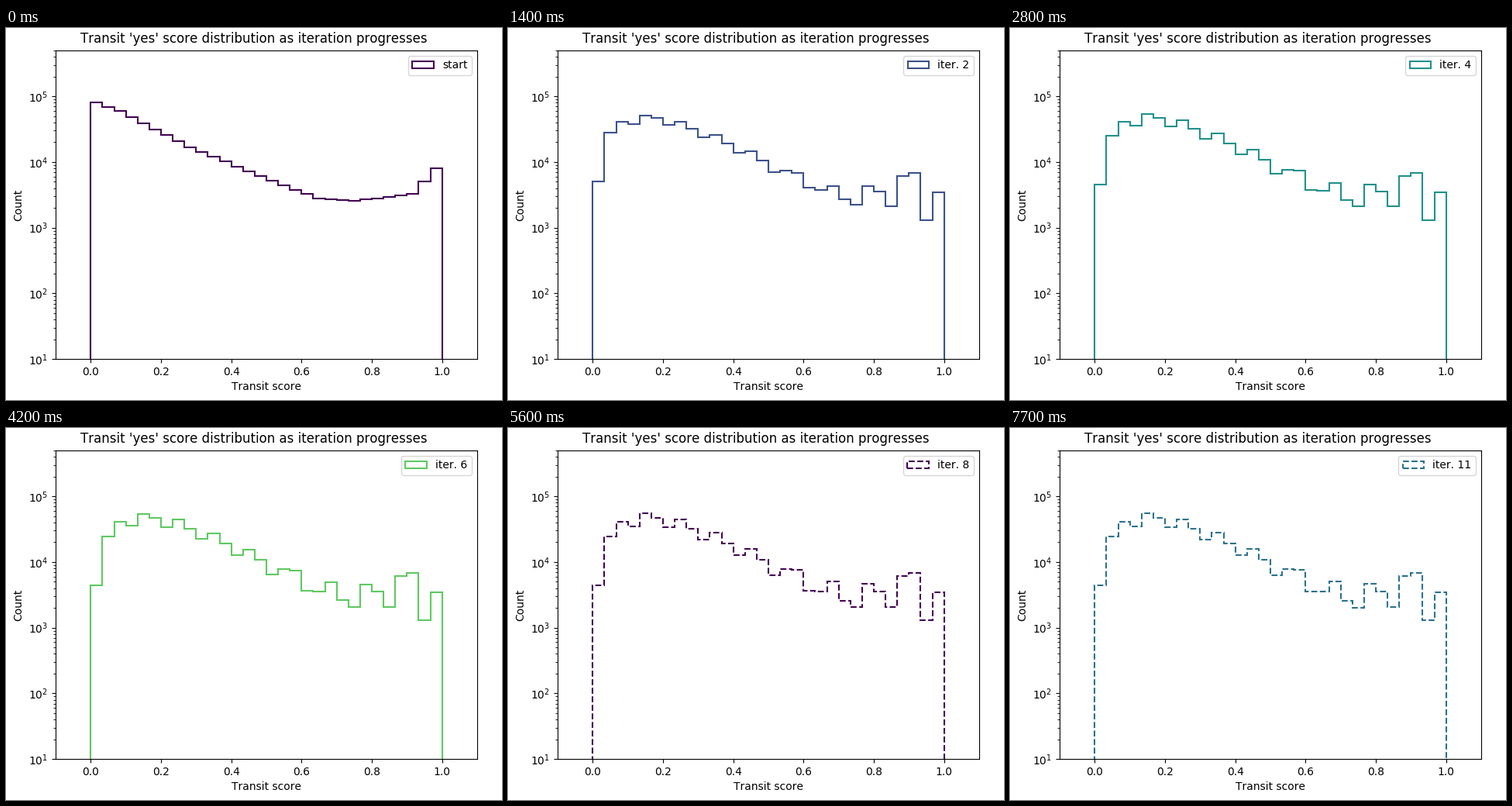
Recreate the animation shown at these times as a matplotlib script. Size 640x480 px, loop 8000 ms.

```python
import numpy as np
import matplotlib.pyplot as plt
from matplotlib.animation import FuncAnimation
from matplotlib.patches import Patch

TICK = 100            # ms per frame
HOLD = 7              # frames per iteration
FRAMES = 80
CYCLE = 8             # colours before the line style changes
BINS = 30
Y_MIN, Y_MAX = 10, 5e5
FLOOR, DECADE = 427.2, 398.4 / np.log10(Y_MAX / Y_MIN)   # pixels

plt.rcParams["text.kerning_factor"] = 6
i = np.arange(BINS)


def curve(points):
    """Piecewise-linear values for all bins from (bin, value) points."""
    return np.interp(i, *zip(*points))


# Heights are pixel rows measured from the top of the stage.
start = curve([(0, 96), (2, 107), (8, 154), (15, 197), (19, 220),
               (22, 223), (25, 218), (27, 214), (29, 181)])
trend = curve([(0, 190), (1, 127), (2, 121), (5, 116), (8, 130), (11, 149),
               (14, 172), (18, 200), (21, 219), (25, 212), (27, 196),
               (28, 226), (29, 223)])

# Ripple of about three bins whose phase drifts to the right.
phase = curve([(13, -0.25), (22, 0.75), (28, 1)])
swing = curve([(1, 0), (3, 9), (12, 9), (28, 22)])
ripple = swing * np.cos(2 * np.pi * (i - phase) / 3)
early = curve([(20, 0), (26, 1)])     # the right end ripples from the outset
edge = 14 * (i < 2)                   # the lowest scores keep thinning out


def levels(step):
    if step == 0:
        return start
    settled = 1 - step ** -1.25
    return trend + edge * settled + ripple * (settled + (1 - settled) * early)


def counts(step):
    return Y_MIN * 10 ** ((FLOOR - levels(step)) / DECADE)


fig, ax = plt.subplots(figsize=(6.4, 4.8), dpi=100)
fig.subplots_adjust(left=0.1, right=0.95, bottom=0.11, top=0.94)
fig.suptitle("Transit 'yes' score distribution as iteration progresses",
             y=0.99, fontsize=12)

x = np.repeat(np.linspace(0, 1, BINS + 1), 2)
outline, = ax.fill(x, np.ones_like(x), closed=False, facecolor="none", lw=1.5)
ax.set_yscale("log")
ax.set_xlim(-0.1, 1.1)
ax.set_ylim(Y_MIN, Y_MAX)
ax.set_xlabel("Transit score")
ax.set_ylabel("Count")


def update(frame):
    step = frame // HOLD
    color = plt.cm.viridis(step % CYCLE / CYCLE)
    dashed = step >= CYCLE
    y = np.r_[0.1, np.repeat(counts(step), 2), 0.1]
    outline.set_xy(np.column_stack([x, y]))
    outline.set_edgecolor(color)
    outline.set_linestyle((2.6, (3.7, 1.6)) if dashed else "-")
    key = Patch(facecolor="none", edgecolor=color, lw=1.5,
                ls="--" if dashed else "-",
                label=f"iter. {step}" if step else "start")
    ax.legend(handles=[key], loc="upper right")


anim = FuncAnimation(fig, update, frames=FRAMES, interval=TICK,
                     repeat=True, repeat_delay=0)
plt.show()
```
